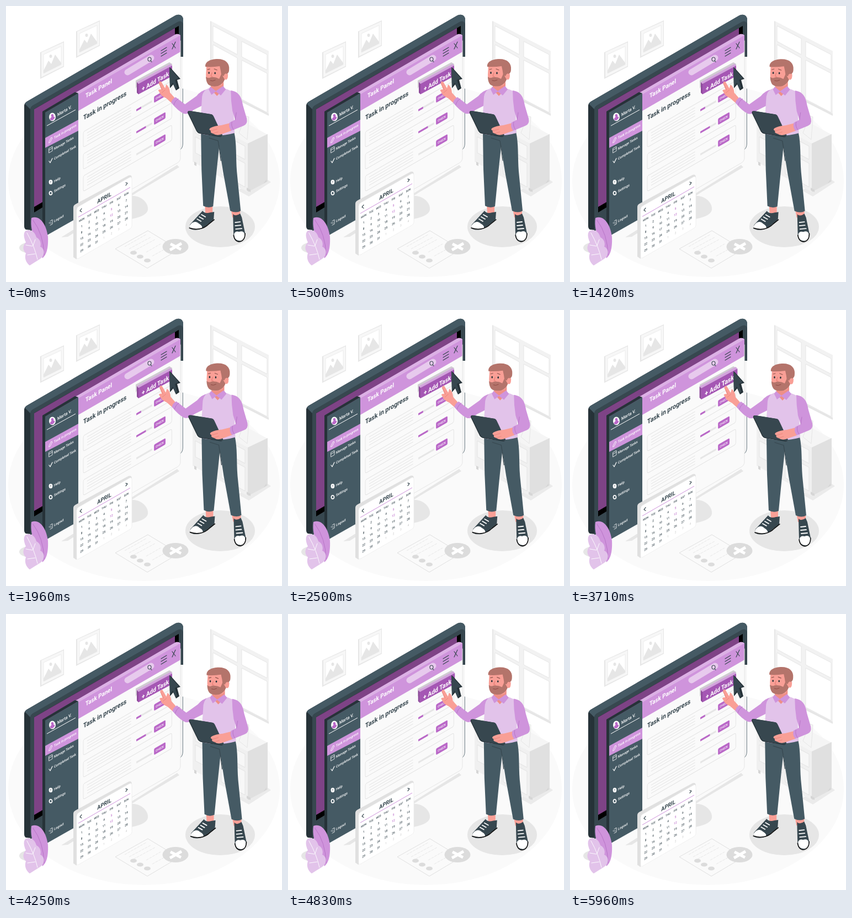
An HTML page for the animation above (6 s loop, 500x500 px).

```html
<!DOCTYPE html>
<html lang="en">
<head>
<meta charset="utf-8">
<title>Task panel</title>
<style>
html, body { margin: 0; width: 100%; height: 100%; overflow: hidden; background: #fff; }
svg { display: block; width: 100%; height: 100%; }
text { font-family: Roboto, "Open Sans", sans-serif; font-weight: 500; }
.bold { font-weight: 700; }
.line { fill: none; stroke-linecap: round; stroke-linejoin: round; }
</style>
</head>
<body>
<svg viewBox="0 0 500 500">
  <ellipse cx="250" cy="317" rx="246" ry="174" fill="#fafafa"/>
  <g id="pictures"></g>

  <!-- window -->
  <path d="M370 27L476 82V199L370 145Z" fill="#e6e6e6"/>
  <path d="M372 28L476 82V195L372 142Z" fill="#f2f2f2"/>
  <path d="M375 36L419 59V88L375 64ZM427 64L473 88V116L427 92ZM375 70L419 94V164L375 141ZM427 98L473 122V193L427 169Z" fill="#fff" stroke="#e6e6e6"/>

  <!-- cabinet -->
  <path d="M420 334L440 345L480 319L465 309Z" fill="#ebebeb"/>
  <path d="M338 196L374 179L474 233L438 251Z" fill="#f5f5f5"/>
  <path d="M338 196L438 249V337L338 282Z" fill="#f0f0f0"/>
  <path d="M438 249L474 232V318L438 337Z" fill="#e0e0e0"/>
  <path d="M343 207L385 229V252L343 230ZM343 237L385 259V288L343 266ZM390 231L433 254V278L390 255ZM390 262L433 285V328L390 304Z" fill="#f7f7f7" stroke="#e3e3e3"/>
  <path d="M436 334V329L443 333V337ZM466 322L472 318V314ZM341 282V288L345 290V284Z" fill="#d6d6d6"/>
  <path d="M408 257l7 4M408 282l7 4" stroke="#d6d6d6" stroke-width="2"/>
  <path d="M422 230L434 199L440 201L437 242Z" fill="#f5f5f5" stroke="#e6e6e6"/>

  <!-- floor -->
  <path d="M100 419L310 288L314 292L240 336L112 418Z" fill="#e6e6e6"/>
  <path d="M200 344H232C248 346 258 358 257 369C255 379 242 383 222 387Z" fill="#e6e6e6"/>
  <ellipse cx="388" cy="400" rx="63" ry="37" fill="#e6e6e6"/>
  <ellipse cx="44" cy="438" rx="20" ry="10" fill="#e6e6e6"/>
  <path d="M198 440L257 407L313 441L256 475Z" fill="#fafafa" stroke="#e0e0e0"/>
  <path d="M215 436L254 414M223 440L262 419M231 444L270 423M254 446L280 431M265 453L292 438" stroke="#e8e8e8" stroke-dasharray="5 1.5"/>
  <g fill="#dcdcdc">
    <ellipse cx="231" cy="447" rx="6" ry="3.6"/><ellipse cx="243" cy="454" rx="6" ry="3.6"/>
    <ellipse cx="256" cy="461" rx="6" ry="3.6"/><ellipse cx="307" cy="436" rx="23.5" ry="14"/>
  </g>
  <path d="M298 431L317 441M318 430L297 442" stroke="#fff" stroke-width="5"/>

  <!-- monitor -->
  <path d="M33 181Q33 176 38 173L307 17Q318 13 321 23V92H316V262L66 408L36 405Q33 403 33 399Z" fill="#263238"/>
  <path d="M44 188Q44 183 49 180L311 29Q321 24 321 34V92H316V250L44 408Z" fill="#37474f"/>
  <path d="M34 177Q36 174 38 173L307 17Q318 13 321 23V34Q320 25 311 29L49 180Q45 182 44 187Z" fill="#455a64"/>
  <path d="M51 187L313 36V215L51 374Z" fill="#000"/>
  <path d="M51 187L306 40V215L51 364Z" fill="#7e4386"/>
  <path d="M316 92V260Q320 258 320 251V92Z" fill="#f5f5f5"/>
  <path d="M320.3 150V250Q320 257 316 260" class="line" stroke="#455a64" stroke-width=".8"/>

  <!-- panel -->
  <path d="M131 170L316 63V275Q316 281 311 284L131 388Z" fill="#fafafa"/>
  <path d="M131 184V160L126 157L306 52Q311 49 316 53V83L131 190Z" fill="#cf94dc"/>
  <path d="M126 157L306 52Q311 49 316 53L131 160Z" fill="#dcb1e5"/>
  <path d="M316 63V274Q316 281 311 284L131 388" class="line" stroke="#e6e6e6"/>
  <path d="M66 191L125 156L131 158L71 193V417L66 413Z" fill="#263238"/>
  <path d="M71 193L131 158V383L71 417Z" fill="#455a64"/>
  <path d="M71 239L131 206V226L71 257Z" fill="#cf94dc"/>
  <path d="M220 120L263 94" class="line" stroke="#e7caed" stroke-width="11"/>
  <g class="line" stroke="#37474f" stroke-width="1.1">
    <ellipse cx="260" cy="96.5" rx="3" ry="3.5"/><path d="M262 99l2 2.500"/>
    <path d="M281 81l10-6M281 86l10-6M281 91l10-6M301 68l6 8M307 65l-6 13" stroke-width="1.200"/>
  </g>
  <path d="M74 217L126 188" stroke="#fff"/>
  <ellipse cx="84" cy="201" rx="6" ry="7.5" fill="#fff"/>
  <ellipse cx="84" cy="198.5" rx="2.3" ry="2.8" fill="#ba68c8"/>
  <path d="M79.5 206C80 200 88 199 88.500 202Q86 208 82 207Z" fill="#ba68c8"/>
  <g class="line" stroke="#fff" stroke-width=".8">
    <path d="M78 246l4-8l2 1l-4 8l-2 1zM78 258l6-3.500v8l-6 3.500zM78 261l6-3.500" />
    <path d="M78 281l2 3l4-8" stroke-width="1.2"/>
    <ellipse cx="81" cy="339" rx="2.5" ry="3.2" stroke-width="1.8" stroke-dasharray="2 .6"/>
    <path d="M80 390l4-3v8l-4 2M78 393h4"/>
  </g>
  <ellipse cx="81" cy="319" rx="3.4" ry="4.2" fill="#fff"/>
  <g id="labels"></g>
  <g id="cards"></g>

  <path d="M235 135L296 102L301 105V109L239 142L235 150Z" fill="#d0cbd2"/>
  <g id="button">
    <path d="M237 138L298 105L301 108L240 141Z" fill="#d3a4dd"/>
    <path d="M237 138L240 141V160L237 157Z" fill="#8e4a9b"/>
    <path d="M240 141L301 108V127L240 160Z" fill="#a557b4"/>
    <text class="bold" transform="matrix(.866 -.5 0 1 246 154.500)" font-size="11.500" fill="#fff">+ Add Task</text>
  </g>
  <path d="M296 111L299 113L316 132L310 134L314 149L308 153L303 142L297 149Z" fill="#263238"/>
  <path d="M296 111L313 131L306 134L310 148L307 151L302 139L297 146Z" fill="#37474f"/>

  <g id="man">
    <!-- feet and legs -->
    <path d="M360 359H374L374 376L361 375ZM407 367H424V383H410Z" fill="#f99f96"/>
    <path d="M356 371Q360 377 370 374L377 373L376 387Q372 393 366 395C356 406 341 408 332 403L333 396Z" fill="#37474f"/>
    <path d="M333 397C338 390 344 389 349 394Q356 398 355 402C346 406 336 405 332 402Z" fill="#fff"/>
    <path d="M332 402C343 406 357 405 367 395L377 387" class="line" stroke="#111" stroke-width="1.600"/>
    <path d="M346 386l7 4M350 382l7 4M354 378l7 4" class="line" stroke="#fff" stroke-width="1.800"/>
    <path d="M411 377Q416 382 424 376L427 383L433 412Q432 427 422 427Q412 425 412 414Z" fill="#37474f"/>
    <path d="M413 413Q415 407 422 409Q430 406 432 413C432 424 427 426 422 425C416 425 413 420 413 413Z" fill="#fff"/>
    <path d="M412 415Q414 427 423 427Q433 425 433 412" class="line" stroke="#111" stroke-width="1.400"/>
    <path d="M415 392l9-1M415 398l10-1M416 404l11-1" class="line" stroke="#fff" stroke-width="1.800"/>
    <path d="M353 228H413C418 250 416 274 418 300L425 371Q417 376 406 371L393 300L386 255L381 302L375 363Q366 367 357 362L354 296Z" fill="#455a64"/>
    <path d="M386 256L384 244L368 239M386 256L389 280" class="line" stroke="#37474f" stroke-width="1.200"/>

    <!-- pointing arm -->
    <path d="M305 166L297 157Q296 146 290 142L288 149L281 137Q277 135 277 140L281 151Q273 151 277 155Q280 163 290 167L300 176Z" fill="#f99f96"/>
    <path d="M277 140L283 152M282 157l6-5" class="line" stroke="#e87f78" stroke-width=".8"/>
    <path d="M364 151Q353 153 345 163L324 178L307 165Q301 168 299 175Q311 190 322 195Q329 197 340 188L362 177Z" fill="#cf94dc"/>
    <path d="M312 168Q306 171 304 179" class="line" stroke="#b775c6"/>

    <!-- torso -->
    <path d="M367 149Q357 152 355 164L353 197L352 231Q382 239 414 230L412 190L418 162Q408 152 394 149Z" fill="#e2c3ea"/>
    <path d="M371 134H394V150L382 163L371 151Z" fill="#ee8f87"/>
    <path d="M370 146L367 151L372 161L380 155L389 162L398 151L393 145L380 154Z" fill="#cf94dc"/>

    <!-- head -->
    <path d="M363 107Q375 103 393 109L402 124Q402 132 396 133L391 143Q380 149 369 143Q362 137 362 125Z" fill="#f99f96"/>
    <path d="M361 110C360 101 370 96 383 96C398 96 405 104 404 115Q404 121 400 123Q397 121 396 127L390 126Q389 117 387 109Q374 111 361 110Z" fill="#b4746b"/>
    <path d="M362 128Q366 132 371 129Q379 128 386 132L390 123L396 133Q393 141 384 145Q372 147 366 142Q362 137 362 128Z" fill="#b4746b"/>
    <path d="M370 135Q374 137 379 134" class="line" stroke="#8e4a45"/>
    <ellipse cx="398" cy="128" rx="3.600" ry="5.500" fill="#f99f96"/>
    <ellipse cx="367.500" cy="121" rx="1.300" ry="1.900" fill="#263238"/><ellipse cx="378.500" cy="121.500" rx="1.300" ry="1.900" fill="#263238"/>
    <path d="M365 115l4-1M377 114l5 2" class="line" stroke="#8e554e" stroke-width="1.200"/>
    <path d="M373 121L371 127L374 128" class="line" stroke="#e2766f"/>

    <!-- tablet and holding arm -->
    <path d="M332 190L370 196Q373 196 375 200L391 234Q391 238 386 237L350 231Q347 230 345 227L329 194Q328 190 332 190Z" fill="#263238"/>
    <path d="M334 190L371 196Q374 196 376 200L392 234Q391 237 387 236L351 230Q348 229 346 226L330 193Q330 190 334 190Z" fill="#37474f"/>
    <path d="M406 212L390 216Q377 217 370 221Q366 224 371 226Q369 230 375 231Q380 235 388 233L408 226Z" fill="#f99f96"/>
    <path d="M371 226L382 223M375 231L384 228" class="line" stroke="#e87f78" stroke-width=".8"/>
    <path d="M407 153C422 155 427 166 429 180L436 204Q438 214 430 217L408 226Q402 219 405 211L415 206L410 190Q407 171 407 153Z" fill="#cf94dc"/>
    <path d="M409 210Q407 217 412 224M415 206L417 193" class="line" stroke="#b775c6"/>
  </g>

  <g id="calendar">
    <path d="M122 365Q122 361 126 359L222 307Q228 305 228 312L128 367V459L122 455Z" fill="#e0e0e0"/>
    <path d="M128 369Q128 365 132 363L223 311Q228 308 228 314V398Q228 402 224 404L132 457Q128 459 128 455Z" fill="#fff" stroke="#ebebeb" stroke-width=".7"/>
    <path d="M131 382.500L225 328.500" stroke="#cf94dc"/>
    <path d="M137 367l-3 4l3 2M217 320l3 1l-3 4" class="line" stroke="#37474f" stroke-width="1.200"/>
    <g id="dates"></g>
  </g>

  <!-- plant -->
  <path d="M46 384C61 378 73 395 76 418C77 440 73 451 66 457C61 435 42 414 46 384Z" fill="#cf94dc"/>
  <path d="M49 388Q68 413 69 451" class="line" stroke="#b775c6"/>
  <path d="M36 407C47 404 53 411 55 419C63 423 64 432 62 436C71 440 71 452 62 458L43 470C36 465 33 456 36 448C29 441 31 433 36 428C32 420 31 410 36 407Z" fill="#e2c3ea"/>
  <path d="M38 411Q52 436 57 459M36 433L48 435M39 451L53 449M53 423L49 434" class="line" stroke="#fff" stroke-width=".9"/>
</svg>
<script>
const el = id => document.getElementById(id);
const iso = (x, y) => `transform="matrix(.866 -.5 0 1 ${x} ${y})"`;
const text = (x, y, size, fill, s, extra = "") =>
  `<text ${iso(x, y)} font-size="${size}" fill="${fill}" ${extra}>${s}</text>`;
const DARK = "#37474f", PURPLE = "#ba68c8", BOLD = 'class="bold"';

el("pictures").innerHTML = [[62, 84], [127, 46]].map(([x, y]) => `<g transform="translate(${x} ${y})">
  <path d="M0 0L43 -20V26L0 48Z" fill="#e6e6e6"/>
  <path d="M2 0L42 -18V25L2 45Z" fill="#f7f7f7"/>
  <path d="M6 4L38 -11V22L6 38Z" fill="#fff" stroke="#ededed"/>
  <path d="M6 38V33L15 15L20 21L27 4L38 19V22Z" fill="#e6e6e6"/>
  <ellipse cx="19" cy="7" rx="2.500" ry="3" fill="#e6e6e6"/></g>`).join("");

el("labels").innerHTML = [
  [144, 167, 11.3, "#fff", "Task Panel", BOLD],
  [140, 207, 12.2, DARK, "Task in progress", BOLD],
  [93, 200, 8, "#fff", "Marta V."],
  [87, 241, 6.4, "#fff", "Task in progress"],
  [87, 261, 6.4, "#fff", "Manage Tasks"],
  [87, 279, 6.4, "#fff", "Completed Task"],
  [87, 320, 6.5, "#fff", "Help"],
  [87, 338, 6.5, "#fff", "Settings"],
  [87, 392, 6.5, "#fff", "Logout"],
  [79.5, 322, 5.5, DARK, "?"]
].map(a => text(...a)).join("");

el("cards").innerHTML = [10, 20, 0].map((done, k) => `<g ${iso(140, 228 + 40 * k)}>
  <rect width="185" height="28" rx="3" fill="none" stroke="#e0e0e0" stroke-width=".9"/>
  ${[6, 11, 16, 21].map(y => `<path d="M8 ${y}H100" stroke="#e3e3e3"/>`).join("")}
  <path d="M111 16.500H144" stroke="#e6e6e6" stroke-width="3.500"/>
  <path d="M111 16.500h${done}" stroke="${PURPLE}" stroke-width="3.500"/>
  <rect x="148" y="10" width="24" height="11.500" rx="2" fill="${PURPLE}"/>
  <text x="160" y="17.800" font-size="5.300" fill="#fff" text-anchor="middle">CHECK</text></g>`).join("");

const mid = 'text-anchor="middle"';
const cell = (col, y) => [137.2 + 13.45 * col, 361 - 7.77 * col + y];
let dates = text(178, 351, 10.5, DARK, "APRIL", `${mid} ${BOLD}`);
["MON", "TUE", "WED", "THU", "FRI", "SAT", "SUN"].forEach((d, col) => {
  dates += text(...cell(col, 28), 5, DARK, d, mid);
});
for (let i = 0; i < 35; i++) {
  const fill = i > 30 ? "#cfcfcf" : i === 4 || i === 11 ? PURPLE : DARK;
  dates += text(...cell(i % 7, 40 + 11 * Math.floor(i / 7)), 5.5, fill, i % 31 + 1, mid);
}
el("dates").innerHTML = dates;

// linear interpolation through [position, value] stops
function track(p, stops) {
  const i = stops.findIndex(s => s[0] > p);
  const [a, u] = stops[i - 1], [b, v] = stops[i];
  return u + (v - u) * (p - a) / (b - a);
}
const beat = [[0, 1], [.1, 1.1], [.3, 1], [.4, 1], [.5, 1.1], [.6, 1], [1, 1]];
const float = [[0, 0], [.5, -10], [1, 0]];

const start = performance.now();
function frame() {
  const t = (performance.now() - start) % 6000, p = t % 1500 / 1500;
  const sway = (1 - Math.cos(2 * Math.PI * (t - 500) / 6000)) / 2;
  el("calendar").setAttribute("transform", `translate(0 ${track(p, float)})`);
  el("button").setAttribute("transform",
    `translate(269 132) scale(${track(p, beat)}) translate(-269 -132)`);
  el("man").setAttribute("transform", `translate(${3 * sway} ${sway})`);
  requestAnimationFrame(frame);
}
frame();
</script>
</body>
</html>
```
